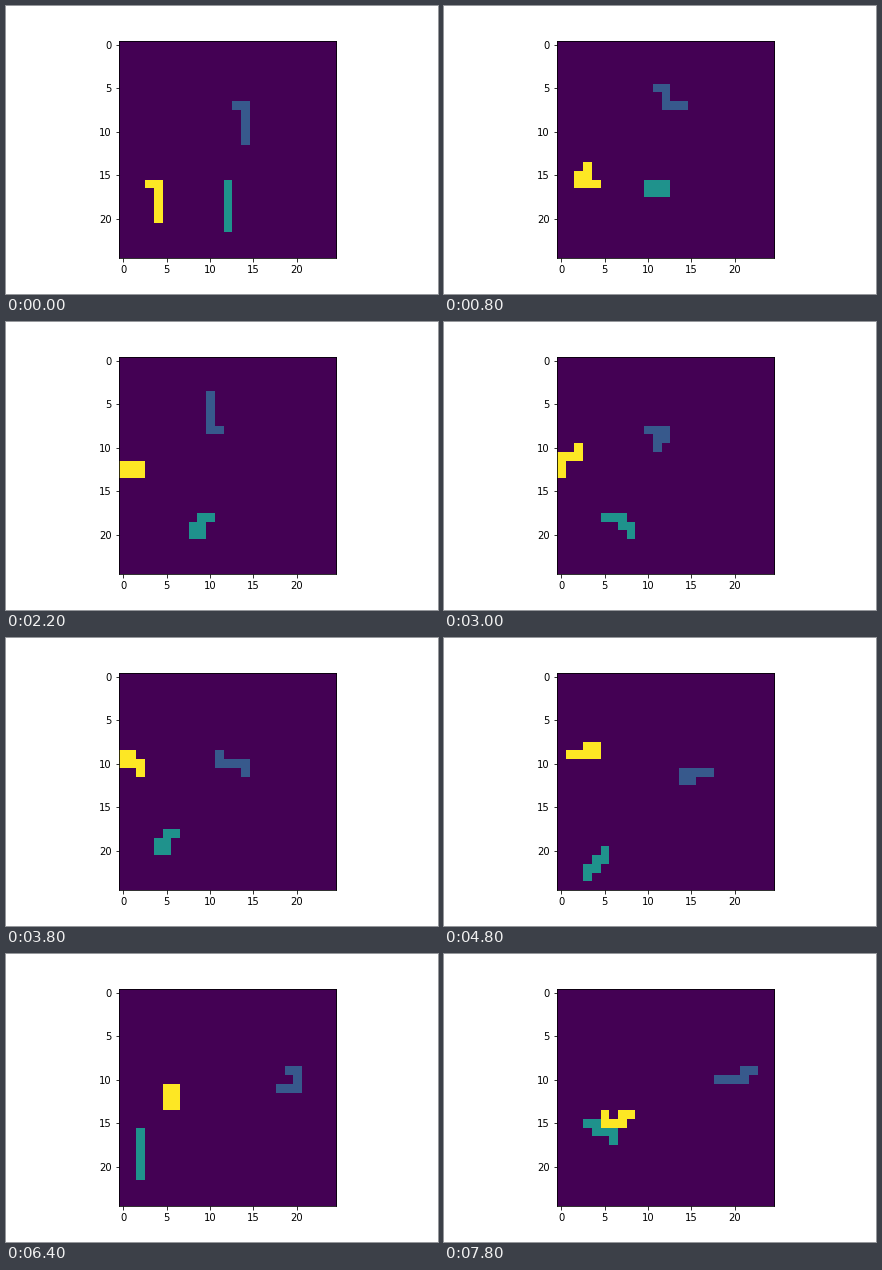
Animation of 432 by 288 pixels, one loop 8000 ms. Source, as a matplotlib script:

```python
import numpy as np
import matplotlib.pyplot as plt
from matplotlib.animation import FuncAnimation

SIZE, LENGTH, STEPS, STEP_MS = 25, 6, 40, 200
MOVES = {"U": (0, -1), "D": (0, 1), "L": (-1, 0), "R": (1, 0)}

# level, tail cell (column, row), moves of the head starting from the tail
WORMS = [
    (0.28, (14, 11), "UUUUL LUUL ULDDDDR RDLDRRRD DRURR URDRRUUL LDRRRUR"),
    (0.51, (12, 21), "UUUUU LLDR DLLDDLU LULLDLDR DLDLD LUUUUUUU URRDRRD"),
    (1.00, (4, 20), "UUUUL LURU LUULDLU URRULLUR RRURD DRDRDLDR DLDRRUR"),
]


def trace(start, moves):
    steps = [MOVES[m] for m in moves.replace(" ", "")]
    return np.cumsum([start] + steps, axis=0)


PATHS = [(level, trace(start, moves)) for level, start, moves in WORMS]


def grid(step):
    cells = np.zeros((SIZE, SIZE))
    for level, path in PATHS:
        col, row = path[step:step + LENGTH].T
        cells[row, col] = level
    return cells


plt.rcParams["font.family"] = "DejaVu Sans"
plt.rcParams["font.size"] = 10
fig, ax = plt.subplots(figsize=(6, 4), dpi=72)
fig.subplots_adjust(left=0.125, right=0.9, bottom=0.125, top=0.88)
image = ax.imshow(grid(0), cmap="viridis", vmin=0, vmax=1,
                  interpolation="nearest")
ax.set_xticks(range(0, SIZE, 5))
ax.set_yticks(range(0, SIZE, 5))


def update(step):
    image.set_data(grid(step))
    return [image]


anim = FuncAnimation(fig, update, frames=STEPS, interval=STEP_MS,
                     repeat=True, repeat_delay=0)
plt.show()
```
